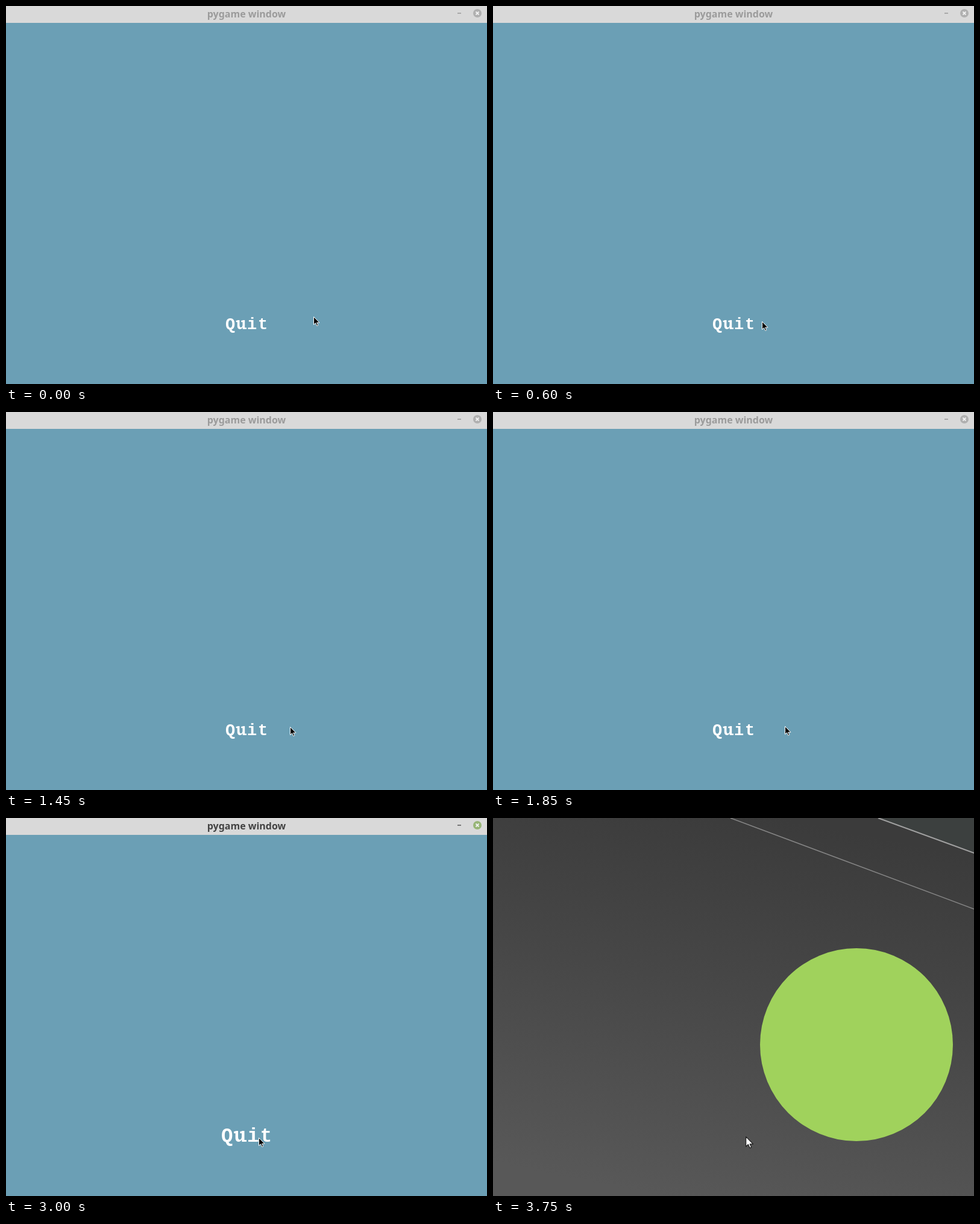
Recreate the animation shown at these times as an HTML page. Size 798 by 627 pixels, loop 4.9 s.

```html
<!DOCTYPE html>
<html lang="en">
<head>
<meta charset="utf-8">
<title>pygame window</title>
<style>
  html, body { margin: 0; width: 100%; height: 100%; overflow: hidden; background: #484848; }
  svg { display: block; width: 798px; height: 627px; }
  .title { font: bold 16px "Noto Sans", "Open Sans", sans-serif; fill: var(--ink); }
  .label { font: bold 27px "Liberation Mono", "Courier New", monospace; letter-spacing: 1.8px; }
  #win { --ink: #9b9b9b; --dash: #a9a9a9; --close: #b0b0b0; }
  #win.active { --ink: #434343; --dash: #777; --close: #97b576; }
</style>
</head>
<body>
<svg viewBox="0 0 798 627">
  <defs>
    <linearGradient id="floor" x1=".6" y1="0" x2=".35" y2="1">
      <stop offset="0" stop-color="#3b3b3b"/>
      <stop offset=".45" stop-color="#474747"/>
      <stop offset="1" stop-color="#585858"/>
    </linearGradient>
  </defs>

  <g id="desk">
    <rect width="798" height="627" fill="url(#floor)"/>
    <path d="M640 0H798V57Z" fill="#3c403f"/>
    <path d="M394 0L798 151" stroke="#858585" stroke-width="1.5"/>
    <path d="M639 0L798 58" stroke="#a0a0a0" stroke-width="2"/>
    <circle cx="603" cy="376" r="160" fill="#a0d25c"/>
  </g>

  <g id="win">
    <rect x="-1" y="-4" width="800" height="632" fill="#6b9fb5"/>
    <rect x="-1" y="-4" width="800" height="32" fill="#d9d9d9"/>
    <text class="title" x="399" y="19" text-anchor="middle">pygame window</text>
    <rect x="749" y="11" width="6" height="2" fill="var(--dash)"/>
    <circle cx="782" cy="12" r="7" fill="var(--close)"/>
    <path d="M779.5 9.5l5 5m0-5l-5 5" stroke="#f2f2f2" stroke-width="1.8"/>
    <g id="quit" fill="#fff">
      <text class="label" x="-35" y="0">Quit</text>
      <!-- slab serifs on the u -->
      <path d="M-17.4-14.3h4v2.6h-4zM-8.8-14.3h4v2.6h-4zM-4-2.6h4v2.6h-4z"/>
    </g>
  </g>

  <path id="cursor" d="M.5.5V13.6L3.5 10.8 5.7 15.5 7.8 14.6 5.7 10.2H10Z" stroke-linejoin="round"/>
</svg>
<script>
const LOOP = 4900, TICK = 50, FOCUS = 3000, FADE = 3650, GONE = 3750;

// pointer moves: start time, end time, x and y reached
const moves = [
  [250, 800, 418, 526],
  [1150, 1200, 429, 526],
  [1300, 1550, 494, 520],
  [1800, 1850, 484, 521],
  [1850, 2150, 422, 530],
  [2250, 2300, 419, 530]
];

const [desk, win, quit, cursor] =
  ["desk", "win", "quit", "cursor"].map(id => document.getElementById(id));

function set(el, attrs) {
  for (const key in attrs) el.setAttribute(key, attrs[key]);
}

function ease(t, from, to) {
  const u = Math.min(1, Math.max(0, (t - from) / (to - from)));
  return u * u * (3 - 2 * u);
}

function pointer(t) {
  let x = 510, y = 515;
  for (const [from, to, nextX, nextY] of moves) {
    const k = ease(t, from, to);
    x += (nextX - x) * k;
    y += (nextY - y) * k;
  }
  return [Math.round(x), Math.round(y)];
}

function draw(time) {
  const t = Math.floor(time / TICK) * TICK;
  const [x, y] = pointer(t);
  const closing = t >= FADE;
  const hover = x < 435;

  set(desk, { visibility: closing ? "visible" : "hidden" });
  set(win, {
    class: t >= FOCUS ? "active" : "",
    visibility: t < GONE ? "visible" : "hidden",
    opacity: closing ? 0.28 : 1,
    transform: closing ? "translate(399 312) scale(.905) translate(-399 -312)" : ""
  });
  set(quit, {
    transform: hover ? "translate(399 537) scale(1.2)" : "translate(399 536)"
  });
  set(cursor, {
    transform: `translate(${x} ${closing ? y - 2 : y}) scale(${closing ? 1.25 : 1})`,
    fill: closing ? "#fff" : "#000",
    stroke: closing ? "#222" : "#fff"
  });
}

const start = performance.now();
function tick() {
  draw((performance.now() - start) % LOOP);
  requestAnimationFrame(tick);
}
tick();
</script>
</body>
</html>
```
